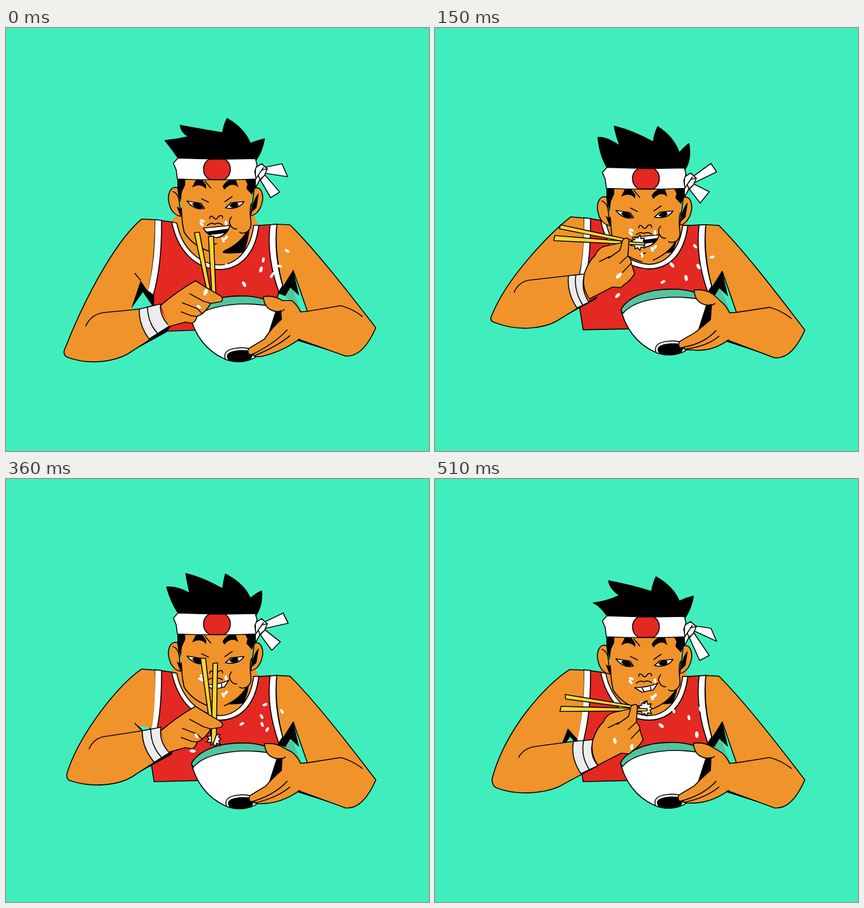
Recreate the animation shown at these times as an HTML page. Size 748 px wide and 748 px high, loop 0.57 s.

```html
<!DOCTYPE html>
<html lang="en">
<head>
<meta charset="utf-8">
<title>Rice bowl</title>
<style>
html, body { margin: 0; width: 100%; height: 100%; overflow: hidden; background: #40eebd; }
svg { display: block; width: 100vw; height: 100vh; }
</style>
</head>
<body>
<svg id="stage" viewBox="0 0 748 748" stroke="#000" stroke-width="1.7" stroke-linejoin="round" stroke-linecap="round"></svg>
<script>
const SKIN = '#f0932b', RED = '#e42822', WHITE = '#fff', BLACK = '#000';
const TEAL = '#52c5a0', YELLOW = '#fad535', GREY = '#ececee';

const shape = (d, fill) => `<path d="${d}" fill="${fill}"/>`;
const line = d => shape(d, 'none');
const flat = (d, fill) => `<path d="${d}" fill="${fill}" stroke="none"/>`;
const move = (x, y, body) => `<g transform="translate(${x} ${y})">${body}</g>`;
const grain = ([x, y, a, s = 1]) =>
  `<ellipse rx="${4.6 * s}" ry="${2.4 * s}" transform="translate(${x} ${y}) rotate(${a})" fill="#fff" stroke="none"/>`;

// Neck, shirt and collar; the shoulders tilt by k.
function torso() {
  return flat('M290 344 L312 320 H432 L447 349 Q442 420 378 424 Q316 420 290 344Z', SKIN) +
    flat('M433 345 L427 378 L421 397 Q400 400 384 398 L380 375Z', BLACK) +
    shape('M263 339 L294 343 C304 396 336 426 378 427 C420 426 442 392 447 349 L479 347 Q474 400 490 458 L483 468 L470 500 L345 534 L262 537 L256 500 L250 466 Q263 410 263 339Z', RED) +
    shape('M263 339 L275 340 Q276 420 260 474 L250 466 Q264 410 263 339Z', WHITE) +
    shape('M467 348 L479 347 Q473 400 490 458 L483 468 Q460 405 467 348Z', WHITE) +
    shape('M293 343 L302 345 C311 390 342 418 378 419 C410 418 433 390 438 349 L447 349 C442 392 420 426 378 427 C336 426 304 396 293 343Z', WHITE);
}

function ribbon([a, b, c, d, e, f, g, h]) {
  return shape(`M455 247 L${a} ${b} L${c} ${d} L459 257Z`, WHITE) +
    shape(`M457 259 L${e} ${f} L${g} ${h} L450 269Z`, WHITE) +
    shape('M441 247 L452 240 L462 249 L457 261 L449 268 L441 283Z', WHITE) +
    line('M443 265 L455 247 M449 268 L446 260 M453 251 L462 249');
}

const hair = p => shape(
  `M305 231 Q292 212 ${p[0]} ${p[1]} Q302 ${p[1] - 2} ${p[2]} ${p[3]} Q${p[4] + 2} ${p[5] + 14} ${p[4]} ${p[5]}` +
  ` Q350 ${p[5] + 8} ${p[6]} ${p[7]} Q${p[6] + 2} ${p[9] + 12} ${p[8]} ${p[9]} Q422 ${p[9] + 18} 432 204` +
  ` Q444 ${p[11] + 3} ${p[10]} ${p[11]} Q454 216 442 234Z`, BLACK);

const mouths = {
  open: shape('M349 354 L396 349 Q392 367 372 371 Q356 367 349 354Z', BLACK) +
    flat('M350 354.500 L395 350 L393 355 L355 360Z', WHITE) +
    flat('M360 366 L386 363 Q380 369 371 370Z', WHITE),
  grin: shape('M353 357 Q375 357 394 349 L386 361 L366 365Z', WHITE) +
    line('M366 358 L370 364 M381 355 L382 362')
};

function head(p) {
  return ribbon(p.ribbon) +
    shape('M304 283 C290 277 284 297 289 312 C292 325 301 332 309 333Z', SKIN) +
    shape('M439 284 C452 277 457 298 452 312 C448 325 440 331 433 332Z', SKIN) +
    line('M295 289 Q304 292 307 307') +
    flat('M302 316 L310 320 L309 334Z', BLACK) +
    flat('M447 292 Q438 300 433 327 L443 318Z', BLACK) +
    flat('M307 260 H438 L433 316 C427 335 440 350 425 362 C416 376 402 387 386 394 C362 402 328 384 314 361 L310 322Z', SKIN) +
    line('M310 318 L312 345 L315 361 C326 379 345 391 366 397 M434 310 C426 335 441 348 427 360 Q419 365 413 361 M425 362 C416 376 402 387 386 394') +
    flat('M303 262 H317 L317 277 L311 290 L309 308 L303 284Z', BLACK) +
    flat('M421 264 H441 L441 279 L435 295 L425 284 L427 276Z', BLACK) +
    flat('M329 282 L336 268 H347 L354 278 L354 285 Q344 273 329 282Z', BLACK) +
    flat('M383 280 Q388 270 400 267 H406 L411 282 Q399 271 386 286Z', BLACK) +
    line('M352 271 L362 283 M346 302 L358 308 M387 307 L400 298') +
    shape('M320 306 L345 310 L351 319 Q333 323 320 306Z', WHITE) +
    shape('M388 318 L398 309 L421 307 Q411 322 388 318Z', WHITE) +
    flat('M329 311 Q336 305 344 311 L349 318 Q335 322 329 311Z', BLACK) +
    flat('M395 315 Q398 308 408 308 Q415 313 407 317 Q400 319 395 315Z', BLACK) +
    line('M360 337 Q361 330 366 334 Q371 342 376 333 Q383 329 383 336 M356 349 Q364 343 369 347 Q376 343 383 348') +
    line('M399 334 C389 345 402 358 408 355 M363 386 L372 381') +
    mouths[p.mouth] +
    [[347, 341, 15], [346, 347, 50], [389, 345, 85], [389, 371, -50], [384, 375, 70], [366, 385, 80]].map(grain).join('') +
    hair(p.hair) +
    shape('M304 230 Q373 233 441 231 L444 242 L440 253 L442 267 Q373 270 303 267 L301 251 L296 239Z', WHITE) +
    shape('M359 232 H387 A21 21 0 0 1 386 268 H360 A21 21 0 0 1 359 232Z', RED);
}

function bowl() {
  return shape('M328 503 C338 484 370 466 420 467 C450 467 472 475 481 488 C482 522 464 562 440 577 Q414 589 388 578 C354 563 335 533 328 503Z', WHITE) +
    shape('M328 503 C338 484 370 466 420 467 C450 467 472 475 481 488 C437 475 356 479 331 510Z', TEAL) +
    shape('M390 579 Q384 562 410 559 Q426 557 438 562 L434 579 Q412 587 390 579Z', WHITE) +
    flat('M395 580 Q387 568 405 564 Q428 560 441 567 L434 580 Q412 587 395 580Z', BLACK);
}

// Arm that steadies the bowl; the hand follows the bowl.
function rightArm(x, y) {
  const at = (a, b) => `${a + x} ${b + y}`;
  return flat('M480 469 L497 442 L498 447 L508 429 L519 476 L503 459 L494 474Z', BLACK) +
    flat('M502 461 L519 474 L532 502 L515 500 L494 474Z', TEAL) +
    flat('M507 463 L519 474 L532 502 L522 500Z', '#40eebd') +
    flat('M512 552 L532 551 L602 580Z', BLACK) +
    shape('M520 502 L533 501 L508 429 L490 458 Q474 400 479 347 L502 348 C545 390 603 464 654 530 Q631 583 600 580 L519 551', SKIN) +
    line('M533 501 L592 491 Q614 497 630 510') +
    flat(`M${at(480, 489)} L${at(489, 494)} L488 518 L${at(462, 545)}Z`, BLACK) +
    shape(`M521 502 Q514 488 505 482 L${at(491, 475)} Q${at(476, 465)} ${at(457, 468)} Q${at(458, 481)} ${at(465, 488)}` +
      ` Q${at(477, 497)} ${at(488, 493)} L487 515 Q470 530 ${at(459, 543)} L${at(431, 560)} Q${at(428, 568)} ${at(433, 571)}` +
      ` L${at(440, 569)} Q${at(437, 575)} ${at(453, 574)} Q488 573 519 550`, SKIN) +
    line(`M${at(479, 495)} Q${at(490, 495)} ${at(494, 491)} M${at(440, 569)} Q476 557 497 534 M${at(440, 573)} Q480 563 502 544`);
}

// Hand holding the sticks upright.
const fist = shape('M274 490 Q302 466 335 447 L356 460 L380 474 Q386 480 380 484 L362 487 Q356 498 346 506 L338 510 Q335 520 329 522 L317 520 L288 528', SKIN) +
  line('M325 470 L349 483 L362 487 M312 486 L338 496 L347 505 M310 502 L328 509 L338 510');

// Hand bringing rice to the mouth.
const pinch = shape('M279 462 Q286 440 298 429 Q304 416 315 413 L343 407 L349 400 Q357 396 358 403 L356 430 Q363 437 362 443 L368 461 Q360 475 349 481 L344 486 L329 485 L288 506 Q274 486 279 462', SKIN) +
  line('M346 406 L342 420 L322 434 M356 430 L342 443 M362 443 L347 459 M306 440 L324 431');

function rice(x, y) {
  let d = '';
  for (let i = 0; i < 18; i++) {
    const a = i * Math.PI / 9, r = i % 2 ? 8.5 : 12.5 + i % 3;
    d += `${i ? 'L' : 'M'}${(x + r * Math.cos(a)).toFixed(1)} ${(y + r * Math.sin(a)).toFixed(1)}`;
  }
  return shape(d + 'Z', WHITE);
}

function leftArm(p) {
  return flat(p.pit, BLACK) + (p.gap ? flat(p.gap, '#40eebd') : '') +
    flat(p.under, BLACK) +
    flat(p.arm, SKIN) + line(p.edge) + line(p.crease) +
    shape(p.band, GREY) + line(p.seam) +
    (p.rice ? rice(...p.rice) : '') +
    p.sticks.map(d => shape(d + 'Z', YELLOW)).join('') +
    move(...p.hand, p.fist ? fist : pinch);
}

const dip = {
  tilt: 0, head: 0, bowl: [-2, 7], mouth: 'open', fist: true, hand: [0, 0],
  hair: [281, 199, 323, 192, 308, 172, 383, 185, 391, 160, 457, 196],
  ribbon: [488, 240, 498, 263, 484, 290, 468, 300],
  pit: 'M238 446 L221 497 H262 L262 472 L250 464Z',
  gap: 'M221 497 L242 467 L258 490 L250 496Z',
  under: 'M222 572 L262 545 L291 528 L284 538Z',
  arm: 'M263 339 L240 338 C205 366 150 450 103 570 Q101 578 108 582 C150 598 198 589 222 572 L290 528 L270 490 L236 497 L221 497 L238 447 L251 465 Q263 410 263 339Z',
  edge: 'M263 339 L240 338 C205 366 150 450 103 570 Q101 578 108 582 C150 598 198 589 222 572 L290 528 M228 434 L238 446',
  crease: 'M141 527 Q151 505 175 503 L237 497',
  band: 'M236 497 L273 488 Q272 511 289 527 L253 550 Q234 524 236 497Z',
  seam: 'M250 493 Q251 522 268 540',
  sticks: ['M333 362 L342 361 L362 466 L356 468', 'M358 369 L367 368 L371 470 L364 470'],
  grains: [[497, 394, 30], [455, 410, 100], [451, 427, 105, 1.2], [470, 438, 125], [484, 421, 10], [475, 433, -20], [391, 420, 50], [421, 453, 60, 1.2], [353, 467, 110, 1.4], [341, 493, 30]]
};

const lift = {
  tilt: .0097, head: 7, bowl: [0, 0], mouth: 'grin', fist: true, hand: [0, -45],
  hair: [284, 184, 325, 195, 318, 160, 383, 187, 388, 161, 452, 191],
  ribbon: [490, 230, 499, 248, 485, 281, 470, 296],
  pit: 'M232 434 L228 444 H242Z',
  under: 'M228 523 L262 498 L296 481 L292 488Z',
  arm: 'M263 338 L240 336 C200 362 130 450 108 520 Q106 530 112 533 C150 546 200 544 230 522 L290 483 L270 440 L241 445 L232 436 L258 440 Q265 400 263 338Z',
  edge: 'M263 338 L240 336 C200 362 130 450 108 520 Q106 530 112 533 C150 546 200 544 230 522 L290 483 M228 432 L238 443',
  crease: 'M147 477 Q156 457 177 455 L242 445',
  band: 'M241 445 L274 439 Q270 465 289 484 L262 501 Q240 474 241 445Z',
  seam: 'M256 442 Q256 472 275 492',
  rice: [368, 460],
  sticks: ['M344 317 L353 317 L368 452 L363 452', 'M366 326 L374 325 L372 452 L367 467 L363 467'],
  grains: [[458, 399, -20], [488, 411, 60], [452, 420, 60], [417, 433, -30], [462, 443, -60], [453, 434, 70], [337, 454, 60], [330, 481, 5, 1.2], [344, 354, 20]]
};

const bite = {
  tilt: .0194, head: 16.500, bowl: [1, -5], mouth: 'open', hand: [-15, -27],
  hair: [288, 177, 327, 192, 317, 157, 386, 185, 394, 158, 449, 188],
  ribbon: [488, 223, 498, 238, 485, 273, 469, 293],
  pit: 'M232 434 L236 438 H240Z',
  under: 'M220 515 L252 494 L288 474 L284 480Z',
  arm: 'M263 336 L240 334 C202 364 124 444 99 512 Q97 518 106 521 C150 538 198 531 222 514 L274 482 L264 436 L236 438 L254 438 Q264 400 263 336Z',
  edge: 'M263 336 L240 334 C202 364 124 444 99 512 Q97 518 106 521 C150 538 198 531 222 514 L274 482',
  crease: 'M140 467 Q148 449 166 446 L236 438',
  band: 'M236 438 L265 435 Q256 460 272 485 L251 495 Q233 468 236 438Z',
  seam: 'M249 437 Q245 465 262 491',
  rice: [360, 380],
  sticks: ['M222 348 L347 375 L346 380 L220 355', 'M212 367 L371 380 L371 384 L210 376'],
  grains: [[490, 405, -10], [460, 386, 50], [466, 422, 60, 1.2], [419, 419, 50, 1.2], [444, 442, 80, 1.2], [403, 449, -30], [325, 438, -45, 1.4], [323, 473, -45, 1.2]]
};

const chew = {
  tilt: .0097, head: 12, bowl: [0, -1], mouth: 'grin', hand: [0, 0],
  hair: [280, 207, 326, 194, 307, 168, 383, 187, 391, 161, 457, 195],
  ribbon: [488, 252, 498, 275, 485, 300, 468, 309],
  pit: 'M235 440 L224 467 H252 L252 460Z',
  gap: 'M232 466 L239 456 L247 465Z',
  under: 'M226 540 L258 519 L290 503 L284 510Z',
  arm: 'M263 338 L238 337 C198 362 125 440 101 530 Q100 541 108 546 C150 562 204 555 230 538 L288 507 L278 461 L245 464 L225 466 L235 441 L252 460 Q264 410 263 338Z',
  edge: 'M263 338 L238 337 C198 362 125 440 101 530 Q100 541 108 546 C150 562 204 555 230 538 L288 507',
  crease: 'M148 492 Q157 476 177 473 L245 464',
  band: 'M245 464 L280 461 Q271 486 288 507 L258 521 Q239 492 245 464Z',
  seam: 'M263 462 Q257 490 273 514',
  rice: [372, 406],
  sticks: ['M230 381 L358 402 L357 406 L231 389', 'M223 402 L375 406 L375 410 L221 411'],
  grains: [[422, 410, 70], [469, 407, 75], [400, 436, 40, 1.2], [449, 422, 80], [463, 452, 85, 1.3], [318, 463, 80, 1.2], [348, 474, 100, 1.2]]
};

function draw(p) {
  const tilt = body => `<g transform="matrix(1 ${p.tilt} 0 1 0 ${-440 * p.tilt})">${body}</g>`;
  return '<rect width="748" height="748" fill="#40eebd" stroke="none"/>' +
    tilt(torso()) + move(0, p.head, head(p)) + move(...p.bowl, bowl()) +
    tilt(rightArm(...p.bowl)) + leftArm(p) + p.grains.map(grain).join('');
}

const stage = document.getElementById('stage');
const cycle = [dip, lift, bite, chew].map(draw);
const holds = [90, 60, 90, 60, 60, 90, 60, 60];
const total = holds.reduce((a, b) => a + b);
let shown = -1;

function update(ms) {
  let t = ms % total, i = 0;
  while (t >= holds[i]) t -= holds[i++];
  if (i % 4 === shown) return;
  shown = i % 4;
  stage.innerHTML = cycle[shown];
}

const start = performance.now();
function tick() {
  update(performance.now() - start);
  requestAnimationFrame(tick);
}
tick();
</script>
</body>
</html>
```
